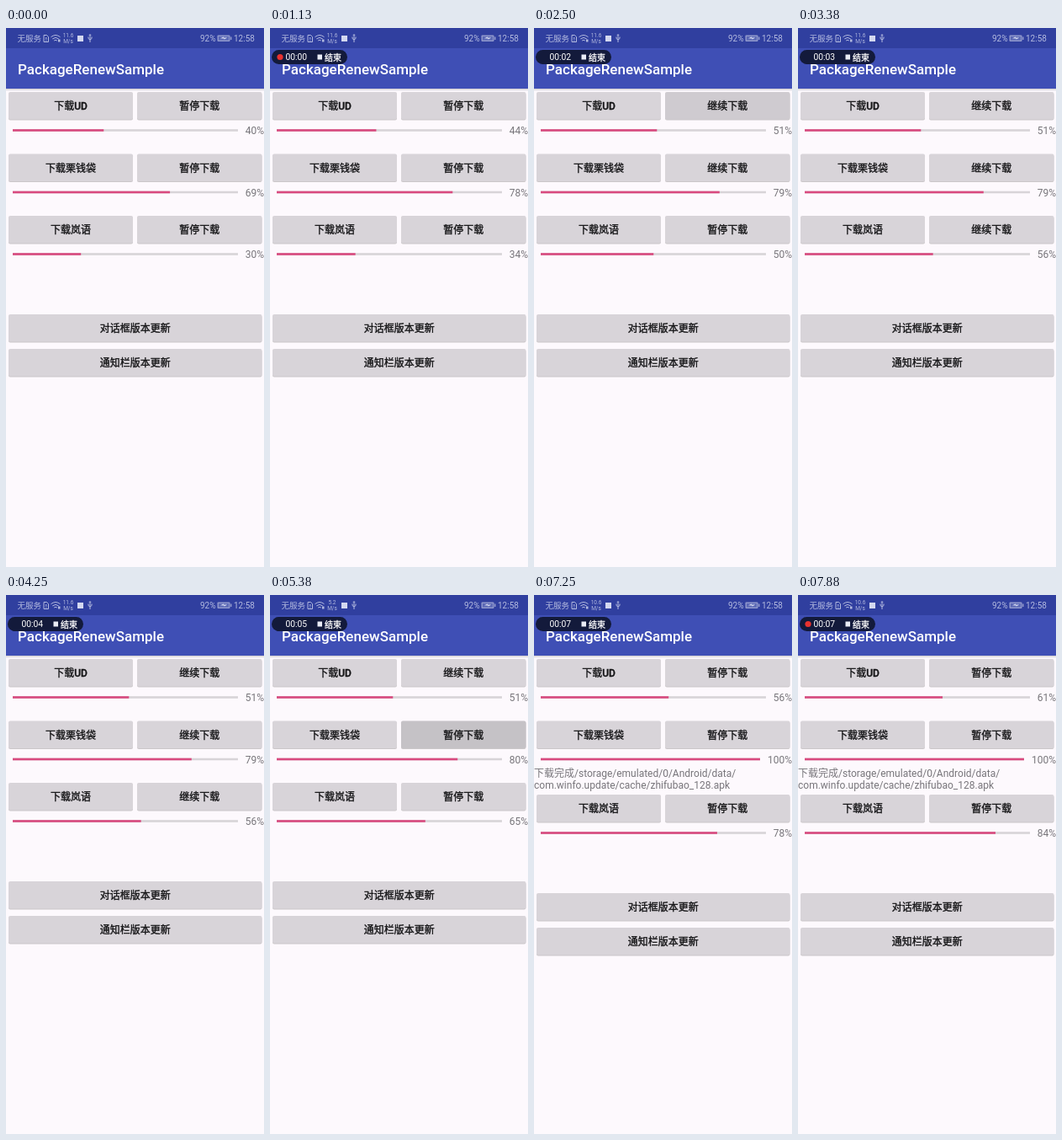
An HTML page that plays this animation: 307 by 640 pixels, repeating every 8000 ms.

```html
<!DOCTYPE html>
<html lang="zh-CN">
<head>
<meta charset="utf-8">
<title>Download progress</title>
<style>
html, body { margin: 0; width: 100%; height: 100%; overflow: hidden; background: #fdf9fd; }
svg { display: block; width: 307px; height: 640px; }
text { font-family: Roboto, "Noto Sans CJK SC", "Noto Sans CJK", sans-serif; font-size: 12px; }
.label { font-weight: 500; fill: #141416; stroke: #141416; stroke-width: .35px; text-anchor: middle; }
.note { fill: #77757a; }
.percent { fill: #77757a; text-anchor: end; }
.status text { fill: #b3badf; }
.status .icon { fill: none; stroke: #b3badf; stroke-width: 1; }
.status .small { font-size: 6.5px; text-anchor: middle; }
.status .info { font-size: 10px; }
.pill text { fill: #fff; }
</style>
</head>
<body>
<svg id="stage" viewBox="0 0 307 640">
  <defs>
    <linearGradient id="shade" x2="0" y2="1">
      <stop stop-color="#000" stop-opacity=".18"/>
      <stop offset="1" stop-color="#000" stop-opacity="0"/>
    </linearGradient>
  </defs>
  <rect width="307" height="640" fill="#fdf9fd"/>
  <rect y="72" width="307" height="3" fill="url(#shade)"/>
  <rect width="307" height="72" fill="#3f4fb5"/>
  <rect width="307" height="24" fill="#303f9f"/>
  <g class="status">
    <text x="13.5" y="16" style="font-size:9.5px">无服务</text>
    <path class="icon" d="M45 8.5h3.5l2 2v6h-5.5z M47.8 11v2.5 M47.8 14.5v1"/>
    <path class="icon" d="M53.5 10.7q5.5-4.4 11 0 M55.3 12.9q3.7-3 7.4 0 M57.2 15q1.8-1.5 3.6 0"/>
    <path d="M62 13.5h2.5v3h-2.5z" fill="#b3badf"/>
    <text id="speed" class="small" x="74" y="10.8"></text>
    <text class="small" x="74" y="18">M/s</text>
    <rect x="85" y="9" width="7" height="7" fill="#d3d8f0"/>
    <path class="icon" d="M100 8v9 M98 10.5v2l2 1.5 2-1.5v-2 M98.8 9l1.2-1.5 1.2 1.5"/>
    <text class="info" x="231" y="16">92%</text>
    <rect x="251.5" y="8.5" width="15" height="7.5" rx="1" fill="#8f98cc"/>
    <rect x="253" y="10" width="12" height="4.5" fill="#5b68b5"/>
    <path d="M255 12.2l4-1.7v1h4.500l-4 2v-1z" fill="#dfe3f5"/>
    <rect x="267" y="10.5" width="1.5" height="3.5" fill="#8f98cc"/>
    <text class="info" x="271" y="16">12:58</text>
  </g>
  <text x="14" y="55" fill="#fff" font-weight="500" style="font-size:17px">PackageRenewSample</text>
  <g id="pill" class="pill">
    <rect x="2" y="26" width="90" height="17" rx="8.5" fill="#131a3b"/>
    <circle id="dot" cx="12" cy="34.5" r="3.6" fill="#e8322f"/>
    <text id="clock" x="18.5" y="38.3" style="font-size:10.3px"></text>
    <rect x="56.5" y="31.5" width="5.5" height="6" fill="#e9ebf5"/>
    <text x="65" y="38.5" stroke="#fff" stroke-width=".3" style="font-size:10px">结束</text>
  </g>
</svg>
<script>
const LOOP = 8000, STEP = 125, CLOCK_START = 200, DONE = 7000, RIPPLE = 375;
const $ = id => document.getElementById(id);
const stage = $("stage");

// keys: [ms, percent]; toggles: pause and resume times
const tasks = [
  { name: "下载UD", toggles: [2250, 6125],
    keys: [[0, 40.4], [1125, 44.2], [2250, 51.6], [6125, 51.6], [6625, 53.4], [7000, 55], [7875, 61.2]] },
  { name: "下载栗钱袋", toggles: [1250, 5250],
    keys: [[0, 69.8], [1125, 78.1], [1250, 79.4], [5250, 79.4], [5375, 80.3], [6625, 95.2], [DONE, 100]] },
  { name: "下载岚语", toggles: [3000, 4625],
    keys: [[0, 30.3], [1125, 34.95], [2500, 50.1], [3000, 56.97], [4625, 56.97], [5375, 65.98], [6625, 73.2], [7000, 75.8], [7875, 84.7]] }
];

function add(parent, tag, attrs, text = "") {
  const el = document.createElementNS("http://www.w3.org/2000/svg", tag);
  for (const key in attrs) el.setAttribute(key, attrs[key]);
  el.textContent = text;
  return parent.appendChild(el);
}

function button(parent, x, y, width, text) {
  const box = { x, width, height: 32.5, rx: 2 };
  add(parent, "rect", { ...box, y: y + 1, fill: "#cbc7c9" });
  add(parent, "rect", { ...box, y, fill: "#d8d4d9" });
  const ripple = add(parent, "rect", { ...box, y, opacity: 0 });
  const label = add(parent, "text", { class: "label", x: x + width / 2, y: y + 21.3 }, text);
  return { ripple, label };
}

tasks.forEach((task, i) => {
  const y = 76 + i * 73.5;
  const line = { x: 8, y: y + 44.2, height: 2.6 };
  const g = task.group = add(stage, "g", {});
  button(g, 3, y, 148, task.name);
  task.toggle = button(g, 156, y, 148.5, "");
  task.track = add(g, "rect", { ...line, fill: "#d8d4d8" });
  task.bar = add(g, "rect", { ...line, fill: "#d94a7f" });
  task.percent = add(g, "text", { class: "percent", x: 307, y: y + 50.2 });
});

const note = add(stage, "g", { class: "note" });
add(note, "text", { x: 0, y: 216 }, "下载完成/storage/emulated/0/Android/data/");
add(note, "text", { x: 0, y: 230 }, "com.winfo.update/cache/zhifubao_128.apk");

const footer = add(stage, "g", {});
button(footer, 3, 340, 301.5, "对话框版本更新");
button(footer, 3, 381, 301.5, "通知栏版本更新");

function valueAt(keys, t) {
  const i = keys.findIndex(key => key[0] > t);
  if (i < 0) return keys[keys.length - 1][1];
  const [t0, v0] = keys[i - 1], [t1, v1] = keys[i];
  return v0 + (v1 - v0) * (t - t0) / (t1 - t0);
}

function show(el, on) {
  el.setAttribute("visibility", on ? "visible" : "hidden");
}

function drawTask(task, t) {
  const value = valueAt(task.keys, t);
  const [pause, resume] = task.toggles;
  const full = value >= 100 ? 261 : 268;
  const sincePress = t - (t >= resume ? resume : pause);
  const glow = sincePress < 0 ? 0 : Math.max(0, 1 - sincePress / RIPPLE);
  task.track.setAttribute("width", full);
  task.bar.setAttribute("width", full * value / 100);
  task.percent.textContent = Math.floor(value) + "%";
  task.toggle.label.textContent = t >= pause && t < resume ? "继续下载" : "暂停下载";
  task.toggle.ripple.setAttribute("opacity", 0.13 * glow);
}

function draw(t) {
  for (const task of tasks) drawTask(task, t);
  const done = t >= DONE;
  const shift = `translate(0 ${done ? 14 : 0})`;
  tasks[2].group.setAttribute("transform", shift);
  footer.setAttribute("transform", shift);
  show(note, done);

  const elapsed = t - CLOCK_START;
  show($("pill"), elapsed >= 0);
  show($("dot"), elapsed >= 0 && elapsed % 1000 >= 500);
  $("clock").textContent = "00:0" + Math.max(0, Math.floor(elapsed / 1000));
  $("speed").textContent = t < 4750 ? "11.6" : t < 7250 ? "5.2" : "10.6";
}

const start = performance.now();
function tick() {
  const t = (performance.now() - start) % LOOP;
  draw(Math.floor(t / STEP) * STEP);
  requestAnimationFrame(tick);
}
tick();
</script>
</body>
</html>
```
